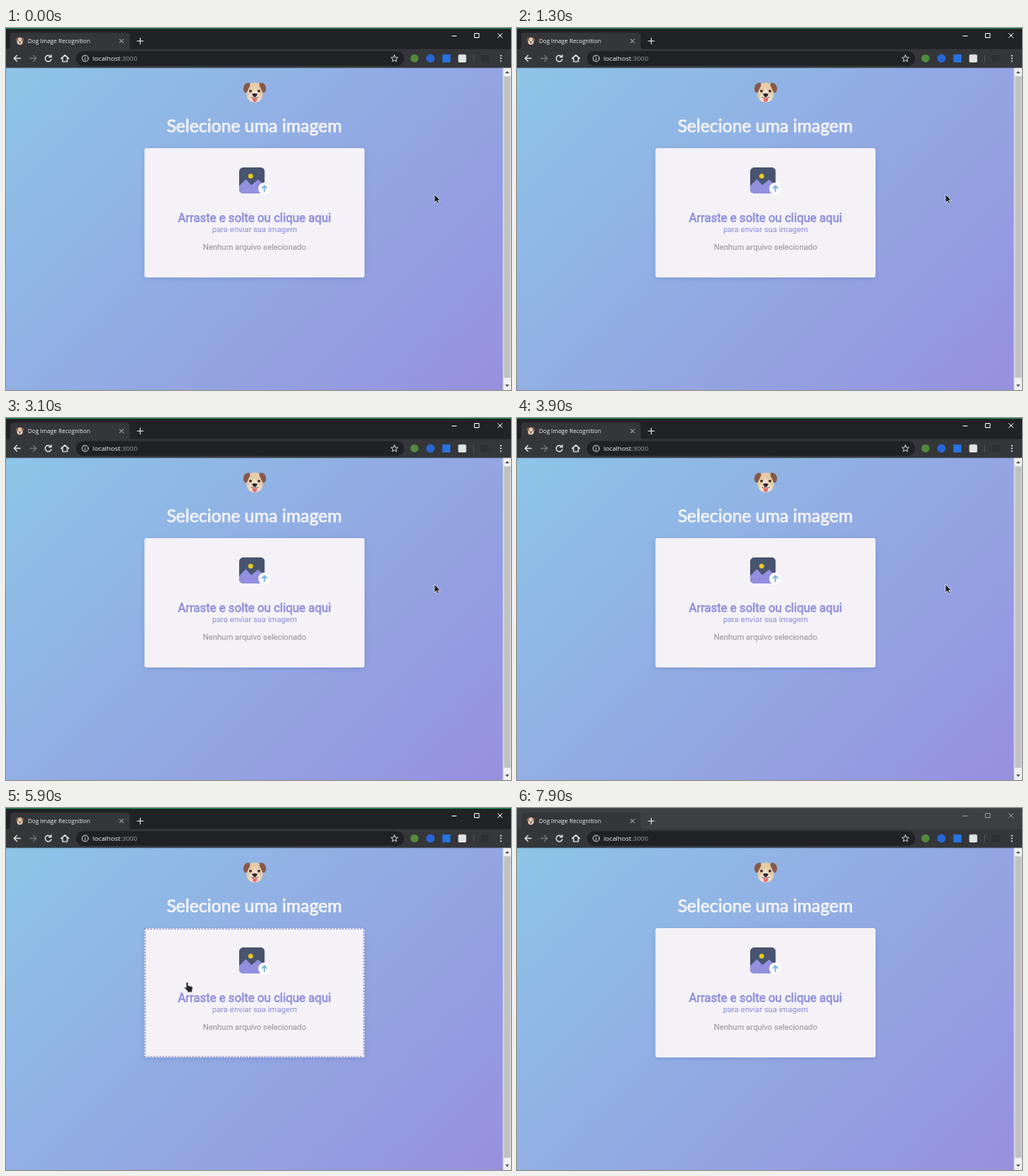
Recreate the animation shown at these times as an HTML page. Size 600 by 431 pixels, loop 8000 ms.

```html
<!DOCTYPE html>
<html lang="pt">
<head>
<meta charset="utf-8">
<style>
  html, body { margin: 0; width: 100%; height: 100%; overflow: hidden; background: #202225; }
  svg { display: block; width: 600px; height: 431px; }
  .ui { font-family: "Open Sans", "Noto Sans", sans-serif; }
  .page { font-family: Roboto, sans-serif; text-anchor: middle; }
  .line { fill: none; stroke-linecap: round; stroke-linejoin: round; }
</style>
</head>
<body>
<svg viewBox="0 0 600 431" xmlns="http://www.w3.org/2000/svg">
  <defs>
    <linearGradient id="sky" gradientUnits="userSpaceOnUse" x1="51.5" y1="-4" x2="538.5" y2="483">
      <stop offset="0" stop-color="#8dc5e8"/>
      <stop offset="1" stop-color="#9790de"/>
    </linearGradient>
    <filter id="soft" x="-10%" y="-10%" width="120%" height="125%">
      <feGaussianBlur stdDeviation="3"/>
    </filter>
    <clipPath id="photo"><rect x="277" y="166" width="30.5" height="31" rx="5"/></clipPath>
    <g id="dog">
      <path d="M0-11.5C7-11.5 9.5-7 9.5 0C10.5 6 8 12 0 12C-8 12-10.500 6-9.5 0C-9.5-7-7-11.5 0-11.5Z" fill="#e6cba6"/>
      <path d="M0-6C1.500-3 2.500 0 3.5 1C8 4 8 9 4 11Q0 12.500-4 11C-8 9-8 4-3.5 1C-2.500 0-1.500-3 0-6Z" fill="#f1e2d0"/>
      <path d="M-6-11C-10-12.500-13.500-9-13.5-4C-13 0-11 1.500-9.300 0L-5.500-8Z" fill="#85594a"/>
      <path d="M6-11C10-12.500 13.5-9 13.5-4C13 0 11 1.500 9.300 0L5.500-8Z" fill="#85594a"/>
      <circle cx="-5" cy="-1.5" r="1.6" fill="#35272a"/>
      <circle cx="5" cy="-1.5" r="1.6" fill="#35272a"/>
      <path d="M-2.500 7H2.500V10Q0 13.5-2.500 10Z" fill="#e86a74"/>
      <path d="M-4.500 6Q-2 8 0 5.500Q2 8 4.500 6" class="line" stroke="#6b5252" stroke-width=".9"/>
      <path d="M-3.2 2Q0 .7 3.2 2Q2.5 5.200 0 5.500Q-2.5 5.200-3.2 2Z" fill="#30262b"/>
    </g>
  </defs>

  <!-- Browser frame -->
  <rect id="titlebar" width="600" height="26"/>
  <rect id="edge" width="600" height="1"/>
  <path d="M1 25.5Q5 25.5 5 21.5V9.5Q5 5.5 9 5.5H143Q147 5.5 147 9.5V21.5Q147 25.5 151 25.5Z" fill="#34363a"/>
  <rect y="25" width="600" height="23" fill="#34363a"/>
  <use href="#dog" transform="translate(16.5 15.5) scale(.36)"/>
  <text class="ui" x="26" y="18" font-size="6.87" fill="#e8eaec">Dog Image Recognition</text>
  <path class="line" d="M135 13.3l4.4 4.4m0-4.4l-4.4 4.4" stroke="#c8cacc" stroke-width=".9"/>
  <path class="line" d="M156 15.5h7m-3.5-3.5v7" stroke="#d8dadc" stroke-width="1.1"/>
  <g id="controls" class="line" stroke-width=".9">
    <path d="M530 9.5h5M584.500 6.5l5 5m0-5l-5 5"/>
    <rect x="557" y="6.5" width="5" height="5"/>
  </g>

  <rect x="83" y="27.5" width="390" height="17.5" rx="8.75" fill="#202124"/>
  <g class="line" stroke="#eceef0" stroke-width="1.2">
    <path d="M17 36.2H9.8M13 32.7L9.5 36.2L13 39.7"/>
    <path d="M28.5 36.2H35.7M32.5 32.7L36 36.2L32.5 39.7" stroke="#75787c"/>
    <path d="M53.2 34A3.7 3.7 0 1 0 53.8 37.3M53.8 32V34.7H51"/>
    <path d="M65.5 36.3L70 32.2L74.5 36.3M67.200 35.500V40H72.800V35.500"/>
    <circle cx="94" cy="36.2" r="3.7" stroke-width=".8"/>
    <path d="M94 36v2M94 34.3v.1" stroke-width=".9"/>
    <path id="star" stroke-width=".8"/>
  </g>
  <text class="ui" x="103" y="39" font-size="7.85" fill="#f1f3f4">localhost<tspan fill="#9a9da1">:3000</tspan></text>
  <circle cx="485.3" cy="36.2" r="4.8" fill="#528a3a"/>
  <circle cx="504.3" cy="36.2" r="5" fill="#2866d4"/>
  <rect x="518.5" y="31.5" width="9.5" height="9.5" fill="#2674e0"/>
  <rect x="537.3" y="31.5" width="9.5" height="9.5" rx="1.5" fill="#e2e3e4"/>
  <path d="M555.5 32v9" stroke="#55585c" stroke-width=".8"/>
  <rect x="564" y="32" width="9.500" height="8.500" fill="#2d2f33"/>
  <g fill="#e2e4e6">
    <circle cx="588" cy="33" r=".9"/><circle cx="588" cy="36.2" r=".9"/><circle cx="588" cy="39.4" r=".9"/>
  </g>

  <!-- Page -->
  <rect y="47.5" width="591" height="383.5" fill="url(#sky)"/>
  <rect x="590.5" y="47.5" width="9.5" height="383.5" fill="#f1f1f1"/>
  <rect x="591.5" y="57.5" width="8" height="359" fill="#c1c1c1"/>
  <path d="M593 54l2.5-2.7 2.5 2.7ZM593 424.5l2.5 2.7 2.5-2.7Z" fill="#505050"/>
  <use href="#dog" x="295.5" y="76.5"/>
  <text x="295" y="124" text-anchor="middle" font-family="Lato, sans-serif" font-size="20.8" fill="#f5f4f8" stroke="#f5f4f8" stroke-width=".65">Selecione uma imagem</text>
  <rect x="164.5" y="145" width="261.5" height="153" rx="3" fill="#4c5a9c" opacity=".28" filter="url(#soft)"/>
  <rect x="164.5" y="143" width="261.5" height="154" rx="2.5" fill="#f4f2f6"/>
  <g id="dots" class="line" stroke="#8585dc" stroke-width="1.8">
    <path d="M165.4 143.9H425.100M165.4 296.100H425.100" stroke-dasharray="0 3.558"/>
    <path d="M165.4 143.9V296.100M425.100 143.9V296.100" stroke-dasharray="0 3.54"/>
  </g>

  <g clip-path="url(#photo)">
    <rect x="277" y="166" width="30.5" height="31" fill="#48546f"/>
    <path d="M277 188L285 180L291.500 187L299.500 180.500L308 188V197H277Z" fill="#9290df"/>
  </g>
  <circle cx="290.7" cy="176.3" r="2.9" fill="#e8cb22"/>
  <circle cx="307" cy="191.3" r="7.3" fill="#fcfcfe"/>
  <path class="line" d="M307 194.8V188.3M304.2 190.7L307 187.9L309.8 190.7" stroke="#78b2e0" stroke-width="1.6"/>

  <g class="page" font-size="9.47">
    <text x="295.2" y="231" font-size="14.15" fill="#8b8cdc" stroke="#8b8cdc" stroke-width=".5">Arraste e solte ou clique aqui</text>
    <text x="295.3" y="243" fill="#8b8cdc">para enviar sua imagem</text>
    <text x="295.3" y="264.3" fill="#a5a4a8" stroke="#a5a4a8" stroke-width=".25">Nenhum arquivo selecionado</text>
  </g>

  <!-- Pointers, each with its hot spot at 0,0 -->
  <path id="arrow" d="M0 0V10L2.3 7.9L3.9 11.3L5.6 10.5L4.1 7.2H7Z" fill="#1c1e22" stroke="#e8eaf4" stroke-width=".7"/>
  <path id="hand" d="M-1.2 .6Q0-.6 1.1 .6V4L5.6 5Q6.7 5.4 6.5 6.8L5.7 10V11.7H.3V10.3L-3.3 6.7Q-3.3 5.2-1.2 6.3Z" fill="#26282c" stroke="#e8eaf4" stroke-width=".5"/>
</svg>
<script>
  const LOOP = 8000, BLUR_AT = 7650;
  const REST = [509, 198], OVER = [215.3, 207.5], AWAY = [236, 445];
  const get = id => document.getElementById(id);
  const set = (id, name, value) => get(id).setAttribute(name, value);
  const show = (id, visible) => set(id, 'visibility', visible ? 'visible' : 'hidden');

  const starPoints = Array.from({ length: 10 }, (_, i) => {
    const angle = i * Math.PI / 5 - Math.PI / 2, radius = i % 2 ? 1.9 : 4.3;
    return `${461.5 + radius * Math.cos(angle)} ${36.5 + radius * Math.sin(angle)}`;
  });
  set('star', 'd', `M${starPoints.join('L')}Z`);

  function travel(from, to, start, end, t) {
    const p = Math.min(1, Math.max(0, (t - start) / (end - start)));
    const eased = p * p * (3 - 2 * p);
    return from.map((v, i) => v + (to[i] - v) * eased);
  }

  function render(t) {
    const [x, y] = t < 6000
      ? travel(REST, OVER, 3950, 4450, t)
      : travel(OVER, AWAY, 6500, 7000, t);
    const hover = x > 164.5 && x < 426 && y > 143 && y < 297;
    const focused = t < BLUR_AT;
    show('dots', hover);
    show('hand', hover);
    show('arrow', !hover);
    for (const id of ['hand', 'arrow']) set(id, 'transform', `translate(${x} ${y})`);
    set('titlebar', 'fill', focused ? '#202225' : '#3d4043');
    set('edge', 'fill', focused ? '#158a4b' : '#46494c');
    set('controls', 'stroke', focused ? '#fff' : '#96999c');
  }

  const began = performance.now();
  function tick() {
    render((performance.now() - began) % LOOP);
    requestAnimationFrame(tick);
  }
  tick();
</script>
</body>
</html>
```
